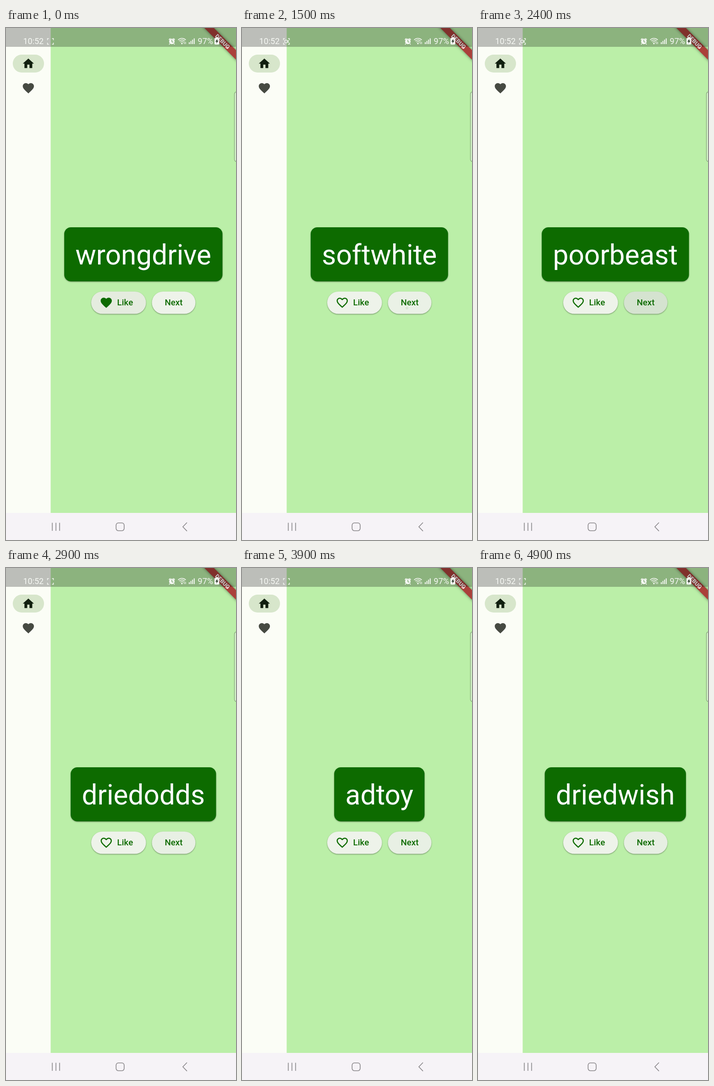
Animation of 502x1115 px, one loop 5000 ms. Source, as an HTML page with a canvas:

```html
<!DOCTYPE html>
<html lang="en">
<head>
<meta charset="utf-8">
<title>Word pairs</title>
<style>
  html, body { margin: 0; width: 100%; height: 100%; overflow: hidden; background: #bbefa8; }
  canvas { display: block; width: 502px; height: 1115px; }
</style>
</head>
<body>
<canvas id="stage"></canvas>
<script>
const W = 502, H = 1115, LOOP = 5000, DP = 1.219;
const FONT = 'Roboto, "Liberation Sans", sans-serif';
const GREEN = '#0d6b00';
const CENTER = 299.8;

const canvas = document.getElementById('stage');
const ratio = window.devicePixelRatio || 1;
canvas.width = W * ratio;
canvas.height = H * ratio;
const ctx = canvas.getContext('2d');

// Each tap on "Next": finger down, release (word changes), touch point.
const taps = [
  { down: 560, up: 650, word: 'softwhite', x: 362, y: 606 },
  { down: 1488, up: 1570, word: 'poorbeast', x: 360, y: 610 },
  { down: 2240, up: 2450, word: 'driedodds', x: 362, y: 608 },
  { down: 3365, up: 3470, word: 'adtoy', x: 358, y: 615 },
  { down: 4390, up: 4480, word: 'driedwish', x: 360, y: 612 }
];
const FADE = 550;

const icons = {
  home: new Path2D('M10 20v-6h4v6h5v-8h3L12 3 2 12h3v8z'),
  heart: new Path2D('M12 21.35l-1.45-1.32C5.4 15.36 2 12.28 2 8.5 2 5.42 4.42 3 7.5 3c1.74 0 3.41.81 4.5 2.09C13.09 3.81 14.76 3 16.5 3 19.58 3 22 5.42 22 8.5c0 3.78-3.4 6.86-8.55 11.54z'),
  heartLine: new Path2D('M16.5 3c-1.74 0-3.41.81-4.5 2.09C10.91 3.81 9.24 3 7.5 3 4.42 3 2 5.42 2 8.5c0 3.78 3.4 6.86 8.55 11.54L12 21.35l1.45-1.32C18.6 15.36 22 12.28 22 8.5 22 5.42 19.58 3 16.5 3zm-4.4 15.55l-.1.1-.1-.1C7.14 14.24 4 11.39 4 8.5 4 6.5 5.5 5 7.5 5c1.54 0 3.04.99 3.57 2.36h1.87C13.46 5.99 14.96 5 16.5 5c2 0 3.5 1.5 3.5 3.5 0 2.89-3.14 5.74-7.9 10.05z')
};

const clamp = v => Math.max(0, Math.min(1, v));

function rect(x, y, w, h, color) {
  ctx.fillStyle = color;
  ctx.fillRect(x, y, w, h);
}

function roundPath(x, y, w, h, r) {
  ctx.beginPath();
  ctx.roundRect(x, y, w, h, r);
}

function raised(x, y, w, h, r, color) {
  ctx.save();
  ctx.shadowColor = 'rgba(0,0,0,.38)';
  ctx.shadowBlur = 2.5 * ratio;
  ctx.shadowOffsetY = 1.2 * ratio;
  ctx.fillStyle = color;
  roundPath(x, y, w, h, r);
  ctx.fill();
  ctx.restore();
}

function icon(path, cx, cy, color) {
  ctx.save();
  ctx.translate(cx, cy);
  ctx.scale(DP, DP);
  ctx.translate(-12, -12);
  ctx.fillStyle = color;
  ctx.fill(path);
  ctx.restore();
}

function text(str, x, y, size, color, weight = 400, align = 'left') {
  ctx.font = `${weight} ${size}px ${FONT}`;
  ctx.textAlign = align;
  ctx.fillStyle = color;
  ctx.fillText(str, x, y);
}

function line(points, color, width) {
  ctx.beginPath();
  points.forEach(([x, y]) => ctx.lineTo(x, y));
  ctx.strokeStyle = color;
  ctx.lineWidth = width;
  ctx.stroke();
}

function drawRail() {
  rect(0, 0, 97.5, 1056, '#fbfdf6');
  ctx.fillStyle = '#d7e6cb';
  roundPath(14.8, 58, 68.2, 39, 19.5);
  ctx.fill();
  icon(icons.home, 48.8, 77.4, '#111f0f');
  icon(icons.heart, 48.8, 131, '#464a42');
}

function drawCard(word) {
  ctx.font = `400 60.3px ${FONT}`;
  const w = ctx.measureText(word).width + 40 * DP;
  raised(CENTER - w / 2, 434, w, 117.7, 14.6, GREEN);
  text(word, CENTER, 515, 60.3, '#fff', 400, 'center');
}

function drawRipple(t, tap) {
  const age = t - tap.down;
  const fade = 1 - clamp((t - tap.up) / FADE);
  if (age < 0 || fade <= 0) return;
  const tint = a => `rgba(13,107,0,${a * fade})`;
  rect(318, 573, 97, 51, tint(0.035 * clamp(age / 30)));
  ctx.fillStyle = tint(0.08);
  ctx.beginPath();
  ctx.arc(tap.x, tap.y, age < 35 ? age * 0.23 : 8 + (age - 35) * 0.85, 0, 7);
  ctx.fill();
}

function drawButtons(t, liked) {
  raised(186, 574, 119.5, 48.6, 24.3, t < 100 ? '#e5ecdf' : '#eef3ea');
  icon(liked ? icons.heart : icons.heartLine, 218.8, 598.2, GREEN);
  text('Like', 242.6, 604.4, 18.8, GREEN, 500);

  raised(318.5, 574, 95, 48.6, 24.3, '#eef3ea');
  ctx.save();
  roundPath(318.5, 574, 95, 48.6, 24.3);
  ctx.clip();
  taps.forEach(tap => drawRipple(t, tap));
  ctx.restore();
  text('Next', 366, 604.4, 18.8, GREEN, 500, 'center');
}

function drawRibbon() {
  ctx.save();
  ctx.translate(W, 0);
  ctx.rotate(Math.PI / 4);
  ctx.shadowColor = 'rgba(0,0,0,.5)';
  ctx.shadowBlur = 6 * ratio;
  rect(-60, 28 * DP, 120, 12 * DP, '#aa403a');
  ctx.shadowColor = 'transparent';
  text('DEBUG', 0, 34 * DP + 4.4, 12.4, '#fff', 900, 'center');
  ctx.restore();
}

function drawEdgeHandle() {
  roundPath(498.5, 139, 20, 152, 5);
  ctx.fillStyle = '#d0efc4';
  ctx.fill();
  ctx.strokeStyle = '#83a479';
  ctx.lineWidth = 1.2;
  ctx.stroke();
}

function drawRecorder(on, color) {
  for (const [x, dx] of [[90.5, 3], [103.5, -3]])
    for (const [y, dy] of [[23, 3.5], [35.5, -3.5]])
      line([[x + dx, y], [x, y], [x, y + dy]], color, 1.4);
  if (!on) return;
  roundPath(93.3, 26.3, 5.6, 6, 1);
  ctx.strokeStyle = color;
  ctx.lineWidth = 1.3;
  ctx.stroke();
  line([[99, 29], [101.3, 27], [101.3, 31.8], [99, 29.6]], color, 1.1);
}

function drawAlarm(color) {
  ctx.fillStyle = color;
  ctx.beginPath();
  ctx.arc(362, 29.3, 6, 0, 7);
  ctx.fill();
  line([[355.5, 25.5], [359, 22.6]], color, 1.8);
  line([[368.5, 25.5], [365, 22.6]], color, 1.8);
  line([[357.6, 34], [356, 36]], color, 1.6);
  line([[366.4, 34], [368, 36]], color, 1.6);
  line([[362, 25.5], [362, 29.8], [365, 31]], '#7fa575', 1.4);
}

function drawWifi(color) {
  ctx.strokeStyle = color;
  ctx.lineWidth = 1.5;
  for (const r of [4.5, 8, 11.5]) {
    ctx.beginPath();
    ctx.arc(384, 34, r, -Math.PI * 0.76, -Math.PI * 0.24);
    ctx.stroke();
  }
  ctx.fillStyle = color;
  ctx.beginPath();
  ctx.arc(384, 33.8, 1.7, 0, 7);
  ctx.fill();
  line([[389, 35], [389, 30]], color, 1.2);
  line([[392, 30], [392, 35]], color, 1.2);
}

function drawBattery(color) {
  rect(458, 20, 4.5, 3, color);
  ctx.fillStyle = color;
  roundPath(455, 21.5, 10.5, 14.5, 2);
  ctx.fill();
  ctx.fillStyle = '#2c3a2a';
  ctx.beginPath();
  for (const [x, y] of [[461.5, 23.5], [457, 29.8], [459.8, 29.8], [459, 34], [463.6, 27.6], [460.8, 27.6]])
    ctx.lineTo(x, y);
  ctx.fill();
}

function drawStatusBar(t) {
  const color = '#f6f8f4';
  rect(0, 0, W, 41, 'rgba(0,0,0,.25)');
  text('10:52', 37.4, 35, 18, color);
  const phase = t % 1000;
  drawRecorder(phase >= 360 && phase < 860, color);
  drawAlarm(color);
  drawWifi(color);
  for (let i = 0; i < 4; i++) {
    const h = 4 + i * 2.8;
    rect(399 + i * 3.6, 35 - h, 2, h, color);
  }
  text('97%', 418.6, 35, 18, color);
  drawBattery(color);
}

function drawNavBar() {
  const color = '#89878a';
  rect(0, 1056, W, 59, '#f6f3f7');
  for (const x of [101, 109, 117]) line([[x, 1077.5], [x, 1095]], color, 1.6);
  roundPath(240.3, 1077.8, 17.6, 17, 5);
  ctx.lineWidth = 1.6;
  ctx.stroke();
  line([[395, 1077], [386, 1086.3], [395, 1095.6]], color, 1.6);
}

function draw(t) {
  ctx.setTransform(ratio, 0, 0, ratio, 0, 0);
  rect(0, 0, W, H, '#bbefa8');
  const last = taps.filter(tap => t >= tap.up).pop();
  drawRail();
  drawCard(last ? last.word : 'wrongdrive');
  drawButtons(t, !last);
  drawRibbon();
  drawEdgeHandle();
  drawStatusBar(t);
  drawNavBar();
}

const start = performance.now();
function tick() {
  draw((performance.now() - start) % LOOP);
  requestAnimationFrame(tick);
}
tick();
</script>
</body>
</html>
```
